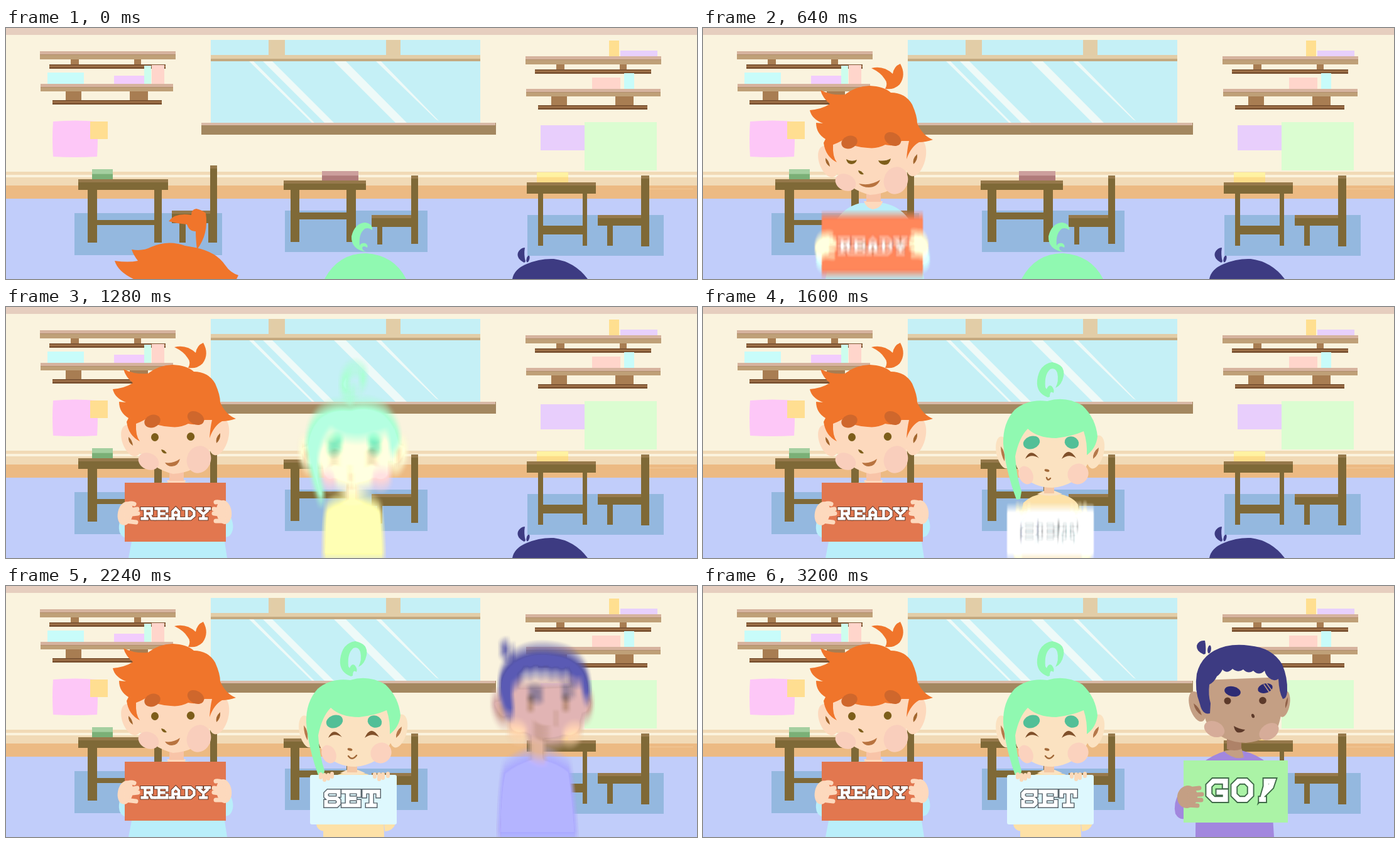
These frames come from a looping animation (1100x400 px, 3360 ms). An HTML page with a canvas:

```html
<!DOCTYPE html>
<html lang="en">
<head>
<meta charset="utf-8">
<title>Ready, set, go!</title>
<style>
html, body { margin: 0; width: 100%; height: 100%; overflow: hidden; }
canvas { display: block; width: 1100px; height: 400px; }
</style>
</head>
<body>
<canvas id="stage" width="1100" height="400" role="img" aria-label="Ready, set, go!"></canvas>
<script>
const W = 1100, H = 400, STEP = 160, STEPS = 21;
const stage = document.getElementById('stage').getContext('2d');
let c = stage;

const newLayer = () => {
  const el = document.createElement('canvas');
  el.width = W;
  el.height = H;
  return el.getContext('2d');
};
const sharp = newLayer(), smear = newLayer(), room = newLayer();

// Drawing helpers; boxes are given by their edges
function box(color, x0, y0, x1, y1) {
  c.fillStyle = color;
  c.fillRect(x0, y0, x1 - x0, y1 - y0);
}
function shape(color, d) {
  c.fillStyle = color;
  c.fill(new Path2D(d));
}
function oval(color, x, y, rx, ry = rx, tilt = 0) {
  c.fillStyle = color;
  c.beginPath();
  c.ellipse(x, y, rx, ry, tilt * Math.PI / 180, 0, 7);
  c.fill();
}
function line(color, width, d) {
  c.strokeStyle = color;
  c.lineWidth = width;
  c.lineCap = c.lineJoin = 'round';
  c.stroke(new Path2D(d));
}

// Averages copies of a drawing spread vertically, with a little sideways softness
function blurred(draw, mid, half, side) {
  const target = c;
  c = sharp;
  c.clearRect(0, 0, W, H);
  draw();
  c = target;
  smear.clearRect(0, 0, W, H);
  smear.globalCompositeOperation = 'lighter';
  const n = 15;
  smear.globalAlpha = 1 / (n * 3);
  for (let i = 0; i < n; i++) {
    const dy = mid + half * (2 * i / (n - 1) - 1);
    for (let k = -1; k <= 1; k++) smear.drawImage(sharp.canvas, k * side, dy);
  }
  c.drawImage(smear.canvas, 0, 0);
}

// Room
const WOOD = '#7f6937', WOOD_LIGHT = '#96794b';

function shelf(x, y, w, h, stripX, stripW, stripY, brackets) {
  for (const [bx, bw] of brackets) box('#a87d52', bx, y + h - 1, bx + bw, stripY);
  box('#bfa078', x, y, x + w, y + h);
  box('#d6b39e', x, y, x + w, y + 5);
  box('#b08d6b', x, y + 5, x + w, y + 6);
  box('#7c5433', stripX, stripY, stripX + stripW, stripY + 7);
  box('#a5764c', stripX, stripY + 2, stripX + stripW, stripY + 4);
}
function slab(x0, y0, x1, y1) {
  box(WOOD, x0, y0, x1, y1);
  box(WOOD_LIGHT, x0, y0, x1, y0 + 5);
}
function desk(x0, y0, x1, y1, legs, bar) {
  for (const [a, b] of legs) box(WOOD, a, y1, b, bar[2]);
  box(WOOD, legs[0][1], bar[0], legs[1][0], bar[1]);
  slab(x0, y0, x1, y1);
}
function chair(x, seatTop, seatEnd, backX, backTop, foot, legX, legW) {
  slab(x, seatTop, backX, seatEnd);
  box(WOOD, legX, seatEnd, legX + legW, foot);
}
function chairBack(x0, top, x1, foot) {
  box(WOOD, x0, top, x1, foot);
  box(WOOD_LIGHT, x0, top, x1, top + 5);
}
function book(x0, y0, x1, y1, pages, cover) {
  box(cover, x0, y0, x1, y1);
  box(pages, x0, y0, x1, y0 + (y1 - y0) * .48);
}

function drawRoom() {
  box('#faf3de', 0, 0, W, 272);
  box('#e6cebf', 0, 0, W, 11);
  box('#f1dab6', 0, 229, W, 251);
  box('#fbf3dd', 0, 234, W, 238);
  box('#ecba83', 0, 251, W, 272);
  box('#f1c998', 1024, 256, 1094, 257);
  box('#c1cdfa', 0, 272, W, H);

  box('#c5f0f6', 326, 19, 755, 152);
  box('#e2cda7', 418, 19, 444, 44);
  box('#e2cda7', 605, 19, 628, 44);
  box('#e2cda7', 326, 43, 755, 50);
  box('#c4a980', 326, 49, 755, 53);
  shape('#eefaf8', 'M387 53H394L491 151H487ZM409 53H424L522 151H507ZM522 53H541L638 151H620ZM589 53H597L689 148L685 146Z');
  box('#a38760', 311, 151, 780, 170);
  box('#d9b9a6', 311, 151, 779, 155);

  shelf(54, 37, 216, 13, 69, 185, 58, [[103, 13], [204, 11]]);
  box('#c8fcfa', 66, 71, 124, 89);
  box('#f2ccfd', 172, 76, 222, 89);
  box('#cdfdee', 220, 60, 231, 89);
  box('#ffd5cb', 232, 59, 252, 89);
  shelf(55, 89, 211, 12, 74, 174, 115, [[95, 25], [197, 29]]);

  box('#ffdf90', 960, 20, 976, 45);
  box('#e8d0fc', 978, 36, 1037, 45);
  shelf(827, 45, 216, 13, 842, 185, 66, [[876, 13], [977, 11]]);
  box('#ffd5cb', 933, 79, 978, 97);
  box('#c8fcfa', 984, 72, 1000, 97);
  shelf(828, 97, 214, 12, 847, 174, 123, [[868, 25], [970, 29]]);

  shape('#fdc7f7', 'M75 149Q110 146 145 149Q147 178 145 205Q110 207 75 205Q73 177 75 149Z');
  box('#ffde91', 134, 149, 162, 177);
  box('#e8cefc', 851, 155, 921, 195);
  box('#dbfdd1', 921, 150, 1036, 227);

  box('#94b8df', 109, 295, 344, 362);
  box('#94b8df', 444, 291, 671, 357);
  box('#94b8df', 830, 298, 1047, 363);

  book(137, 225, 170, 241, '#a4cfa0', '#7bb077');
  desk(115, 241, 258, 258, [[130, 145], [236, 248]], [306, 314, 342]);
  chair(264, 291, 311, 325, 219, 342, 276, 10);
  chairBack(325, 219, 336, 342);
  box(WOOD, 322, 311, 326, 342);

  book(503, 228, 561, 243, '#cc9f9d', '#b07c7b');
  desk(442, 243, 573, 258, [[453, 467], [542, 557]], [294, 305, 341]);
  chair(582, 298, 317, 645, 235, 345, 591, 8);
  chairBack(645, 235, 656, 344);

  book(845, 230, 895, 246, '#fff2a2', '#fcdc88');
  desk(829, 246, 939, 264, [[847, 855], [918, 925]], [315, 329, 347]);
  chair(942, 298, 315, 1011, 235, 347, 957, 9);
  chairBack(1011, 235, 1024, 348);
}

// Block lettering on a 14-unit square
const GLYPHS = {
  R: 'M1 2H10.5V7H4M4 2V12M1 12H6M8 7L10.5 12H13',
  E: 'M1 2H12V4.5M4 2V12M1 12H12V9.5M4 7H9',
  A: 'M7 2L4 5V12M7 2L10 5V12M1.5 12H5M9 12H12.5M4 8.5H10',
  D: 'M1 2H8L11.5 5V9L8 12H1M4 2V12',
  Y: 'M1 2H5M9 2H13M3 2V4L7 7.5L11 4V2M7 7V12M4 12H10',
  S: 'M11.5 4.5V2H4L2.5 3.5V5.5L4 7H10L11.5 8.5V10.5L10 12H2.5V9.5',
  T: 'M2 5V2H12V5M7 2V12M4.5 12H9.5',
  G: 'M11.5 4.5V2H5L2.5 4.5V9.5L5 12H11.5V8H8',
  O: 'M5 2H9L11.5 4.5V9.5L9 12H5L2.5 9.5V4.5Z',
  '!': 'M7 2H10.5L9.5 5L6 8.5L7 5ZM4.5 12H5.5'
};
function letters(word, x, y, size, pitch, ink) {
  for (const [color, width] of [[ink, 4], ['#fff', 2.7]]) {
    [...word].forEach((ch, i) => {
      c.save();
      c.translate(x + i * pitch, y);
      c.scale(size / 14, size / 14);
      c.lineCap = 'square';
      c.lineJoin = 'miter';
      c.strokeStyle = color;
      c.lineWidth = width;
      c.stroke(new Path2D(GLYPHS[ch]));
      c.restore();
    });
  }
}

// Orange hair
const PEACH = '#fdd9bd', ORANGE = '#f0752b';
const red = {
  rise: 1, lift: 4, blurMid: 4, signDrop: 18,
  peek() {
    shape(ORANGE, 'M173 371Q195 374 210 371Q203 362 200 353Q218 356 231 349Q258 337 285 347L302 350Q335 357 349 378Q357 390 370 394L367 400H203Q178 388 173 371Z');
    shape(ORANGE, 'M259 308Q269 294 295 298Q295 289 303 288Q312 290 318 295Q323 328 304 353Q302 336 302 324Q292 325 288 313Q273 312 259 308Z');
  },
  body(step) {
    shape('#b9eefa', 'M195 400L200 374Q196 293 250 279H288Q342 290 348 374L352 400Z');
    shape(PEACH, 'M256 276H286Q284 287 270 289Q260 287 256 276Z');
    box('#f8c4a8', 260, 258, 283, 277);
    oval(PEACH, 199, 213, 14, 26, -20);
    oval(PEACH, 339, 207, 15, 30, 14);
    shape('#a3672f', 'M195 207Q194 216 202 221Q201 212 195 207ZM341 201Q333 208 335 217Q342 211 341 201Z');
    shape(PEACH, 'M205 165Q203 212 210 227Q232 258 266 266Q304 264 321 235Q336 200 338 160Z');
    oval('#f9cebc', 227, 246, 17, 13, 25);
    oval('#f9cebc', 307, 243, 19, 22, 20);
    shape(ORANGE, 'M170 131Q190 129 202 121Q190 111 187 99Q205 108 226 106Q242 93 265 92Q288 93 299 103Q322 103 333 122Q341 140 341 152Q350 172 366 178Q354 182 344 182Q331 189 324 209Q325 193 328 180L316 180Q307 190 290 186Q277 193 262 191Q240 190 222 179Q215 183 207 186Q206 205 213 214Q195 205 192 183L195 177Q180 168 180 151L191 152Q173 145 170 131Z');
    shape(ORANGE, 'M268 64Q287 59 302 73Q304 61 314 57Q324 75 313 90Q304 99 290 97Q295 88 289 81Q283 71 268 64Z');
    oval('#cf672c', 233, 182, 13, 10, -20);
    oval('#cf672c', 302, 177, 14, 10, 28);
    if (step >= 3 && step < 6) {
      shape('#7d5e1a', 'M228 209Q236 214 245 210Q243 217 236 217Q229 216 228 209ZM279 211Q290 213 299 208Q297 218 289 218Q281 217 279 211Z');
      shape('#b8733f', 'M248 248Q266 252 282 242Q277 254 264 254Q254 254 248 248Z');
    } else {
      oval('#7d5e1a', 237, 207.5, 6, 6.5);
      oval('#7d5e1a', 294, 206.5, 6.2, 6.5);
      shape('#b8733f', 'M253 248Q266 250 277 242Q274 254 264 254Q257 254 253 248Z');
    }
    shape('#7d5e1a', 'M247 227Q252 227 256 233Q249 235 247 227Z');
  },
  sign() {
    shape('#b9eefa', 'M182 338Q175 362 190 368V335ZM349 322Q364 340 361 355Q358 367 349 367Z');
    box('#e2774f', 189, 280, 350, 374);
    oval(PEACH, 190, 329, 12, 19, 12);
    line(PEACH, 7, 'M189 317Q197 311 204 314M192 325L209 322M192 331L210 329M190 341L207 343');
    oval(PEACH, 347, 327, 12, 19, -8);
    line(PEACH, 7, 'M349 316Q343 310 334 311M347 325L331 322M347 331L331 329M348 341L334 341');
    letters('READY', 215, 318, 22.5, 22, '#6b3a28');
  }
};

// Green hair
const CREAM = '#fbe2c1', MINT = '#90f9b1', FINGER = '#fbd9b8';
const mint = {
  rise: 8, lift: 10, blurMid: 4, signDrop: 19,
  peek() {
    shape(MINT, 'M507 400Q529 359 573 359Q618 362 637 400Z');
    shape(MINT, 'M574 357Q549 353 550 332Q555 311 572 310Q584 312 583 322Q577 317 571 320Q561 328 563 347Q565 342 572 343Q577 346 575 350Q569 346 567 350Q567 355 574 357Z');
  },
  body(step) {
    shape('#fde1a7', 'M505 400Q505 328 510 312Q523 299 545 297H560Q588 300 597 315Q601 350 602 400Z');
    shape(CREAM, 'M532 298L543 293H560L572 298Q552 304 532 298Z');
    box('#f4c7a4', 543, 283, 559, 297);
    oval(CREAM, 479, 232, 12, 26, -12);
    oval(CREAM, 625, 231, 13, 27, 14);
    shape('#b5784a', 'M474 222Q474 236 480 246Q482 231 474 222ZM630 224Q620 231 621 242Q630 235 630 224Z');
    shape(CREAM, 'M492 190Q488 246 508 268Q527 288 556 288Q592 285 608 258Q622 235 622 180Z');
    oval('#fbd2be', 514, 268, 11, 15, -25);
    oval('#fbd2be', 597, 266, 16, 17, 50);
    shape(MINT, 'M505 306L499 307Q481 258 478 218Q477 185 496 164Q517 146 548 150Q577 141 604 157Q625 177 628 206Q626 225 611 236Q612 216 606 198Q588 206 562 209Q533 209 517 194Q503 208 497 238Q499 270 507 294Z');
    shape(MINT, 'M549 144Q530 137 532 117Q535 91 556 88Q577 92 574 110Q571 125 561 129Q567 118 564 105Q561 96 553 99Q543 107 545 128L547 131Q550 123 555 126Q560 132 558 137Q552 132 552 143Z');
    oval('#52bf97', 523, 216, 13.5, 10, -20);
    oval('#52bf97', 587, 216, 11.5, 9.5, 20);
    shape('#80502a', 'M513 242Q521 223 535 241Q523 233 513 242ZM571 242Q581 220 594 241Q583 233 571 242Z');
    oval('#a26a3a', 547.5, 260.5, 4, 2, 15);
    line('#a26a3a', 2.4, step < 12 ? 'M547 272Q549 278 553 273' : 'M545 271Q551 279 558 270');
  },
  sign() {
    shape('#fde1a7', 'M494 379H508V391Q495 390 494 379ZM602 379H620Q616 390 603 391Z');
    c.fillStyle = '#def8fe';
    c.beginPath();
    c.roundRect(484, 301, 138, 79, 3);
    c.fill();
    line(FINGER, 6, 'M501 300V305M507 301V309M513 301V307M519 299V304M587 300V304M594 300V308M600 300V306M608 299V303');
    letters('SET', 504, 323, 31, 31, '#57636a');
  }
};

// Navy hair
const TAN = '#c49f84', NAVY = '#3d3b82', VIOLET = '#a287de';
const navy = {
  rise: 14, lift: 16, blurMid: 4, signDrop: 20,
  peek() {
    shape(NAVY, 'M806 400Q809 384 829 376Q850 367 872 368Q905 372 926 400Z');
    shape(NAVY, 'M825 374Q812 367 815 358Q819 350 826 350Q824 361 827 372Z');
    oval(NAVY, 831, 368, 2.3, 5.5, 15);
  },
  body(step) {
    shape(VIOLET, 'M784 400Q784 320 792 284Q812 268 835 262H857Q882 268 898 282Q905 330 909 400Z');
    shape(TAN, 'M829 263L857 258L861 273Q845 278 829 263Z');
    shape('#ae8268', 'M834 240H857V260Q846 264 834 260Z');
    oval(TAN, 787, 192, 12, 25, -18);
    oval(TAN, 925, 188, 9, 21, 10);
    shape('#906148', 'M781 187Q783 200 794 206Q791 194 781 187ZM931 177Q926 185 927 195Q932 187 931 177Z');
    shape(TAN, 'M796 150Q792 200 803 220Q825 249 864 250Q903 246 916 222Q925 195 924 145Z');
    oval('#d6ac99', 814, 228, 17, 12, 25);
    oval('#d6ac99', 901, 232, 17, 12, -35);
    shape(NAVY, 'M807 203Q795 206 791 188Q782 165 786 140Q794 106 832 96Q850 92 870 95Q906 98 922 125Q931 146 930 168Q929 180 923 180Q917 170 916 148Q909 153 902 147Q896 143 894 135Q885 144 876 135Q868 141 860 133Q852 139 843 132Q834 141 827 133Q824 140 818 144Q814 153 806 157Q804 174 808 187Z');
    shape(NAVY, 'M797 109Q785 104 786 95Q789 86 799 87Q801 96 800 108Z');
    oval(NAVY, 806, 101, 2.8, 6.5, 8);
    oval('#2d2b74', 843, 168, 13, 8, 12);
    oval('#2d2b74', 895, 163, 12, 7.5, -15);
    line(TAN, 1.4, 'M893 157L902 170M897 155L905 166');
    oval('#5d3a2a', 835, 183, 5.5);
    oval('#5d3a2a', 891, 182.5, 5.8);
    oval('#5d3a2a', 875.5, 207, 2.4, 3.4, -20);
    shape('#5d3a2a', step < 18
      ? 'M838 219Q849 229 868 230Q861 235 850 232Q840 228 838 219Z'
      : 'M845 223Q853 228 863 229Q858 235 850 233Q846 230 845 223Z');
  },
  sign() {
    shape(VIOLET, 'M758 330Q748 346 752 363Q758 373 766 371V330Z');
    box('#abf3a6', 765, 278, 931, 377);
    oval(TAN, 771, 336, 16, 18, 15);
    line(TAN, 7, 'M773 324L790 322M774 333L794 332M774 341L793 341M772 349L787 350');
    letters('GO', 798, 305, 41, 40, '#3f6a48');
    letters('!', 876, 305, 41, 40, '#3f6a48');
  }
};

function drawKid(kid, step) {
  if (step < kid.rise) return kid.peek();
  const body = () => kid.body(step);
  if (step === kid.rise) blurred(body, kid.blurMid, 12, 3);
  else body();
  if (step === kid.lift) blurred(kid.sign, kid.signDrop, 8, 1);
  else if (step > kid.lift) kid.sign();
}

c = room;
drawRoom();
c = stage;

let shown = -1;
function tick(now) {
  const step = Math.floor(now / STEP) % STEPS;
  if (step !== shown) {
    shown = step;
    c.drawImage(room.canvas, 0, 0);
    for (const kid of [red, mint, navy]) drawKid(kid, step);
  }
  requestAnimationFrame(tick);
}
const start = performance.now();
const loop = () => tick(Math.max(0, performance.now() - start));
tick = (orig => () => { orig(performance.now() - start); })(tick);
tick();
</script>
</body>
</html>
```
